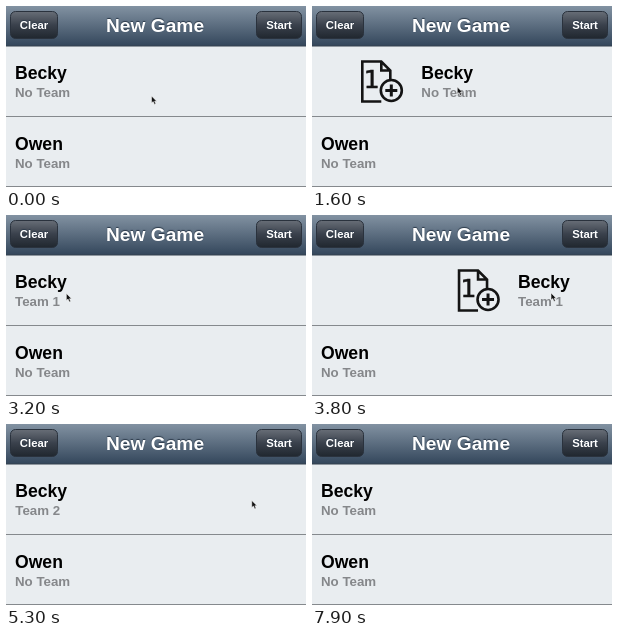
Animation of 300x181 px, one loop 8800 ms. Source, as an HTML page:

```html
<!DOCTYPE html>
<html lang="en">
<head>
<meta charset="utf-8">
<title>Swipe to pick a team</title>
<style>
  html, body { margin: 0; width: 100%; height: 100%; overflow: hidden; background: #e9edf0; }
  svg { display: block; width: 100%; height: 100%; }
  text { font: bold 17.6px "Liberation Sans", Arial, sans-serif; }
  .team { font-size: 13.3px; fill: #85878a; }
  .bar { fill: #fff; text-anchor: middle; text-shadow: 0 -1px 1px #2c3a4a; }
  .title { font-size: 19.2px; }
  .button { font-size: 11.3px; }
  #digit { font: 25px "DejaVu Sans", sans-serif; text-anchor: middle; }
</style>
</head>
<body>
<svg viewBox="0 0 300 181">
  <defs>
    <linearGradient id="header" x2="0" y2="1">
      <stop stop-color="#8292a2"/><stop offset="1" stop-color="#33465b"/>
    </linearGradient>
    <linearGradient id="button" x2="0" y2="1">
      <stop stop-color="#686e77"/><stop offset=".5" stop-color="#3a414c"/><stop offset="1" stop-color="#20272f"/>
    </linearGradient>
  </defs>
  <rect width="300" height="181" fill="#e9edf0"/>

  <g id="cell">
    <text x="9" y="73">Becky</text>
    <text class="team" id="team" x="9" y="91">No Team</text>
  </g>
  <text x="9" y="144">Owen</text>
  <text class="team" x="9" y="161.5">No Team</text>
  <path d="M0 110.5H300M0 180.5H300" stroke="#85898d"/>

  <g id="page" fill="none" stroke="#141414" stroke-width="2.6">
    <path d="M20 41H1V1H20L29 10V20M20 1V10H29"/>
    <text id="digit" x="10.5" y="27.5" fill="#141414" stroke-width=".5">1</text>
    <circle cx="30" cy="30" r="10.5" fill="#e9edf0"/>
    <path d="M24 30H36M30 24V36" stroke-width="3"/>
  </g>
  <path id="cross" d="M-7 -7L7 7M7 -7L-7 7" stroke="#0c0c0c" stroke-width="6"/>

  <rect width="300" height="40" fill="url(#header)"/>
  <path d="M0 40H300" stroke="#35414f"/>
  <g fill="url(#button)" stroke="#2a323d">
    <rect x="4.5" y="5.5" width="47" height="27" rx="5"/>
    <rect x="250.5" y="5.5" width="45" height="27" rx="5"/>
  </g>
  <text class="bar button" x="28" y="23">Clear</text>
  <text class="bar title" x="149" y="25.5">New Game</text>
  <text class="bar button" x="273" y="23">Start</text>

  <path id="cursor" d="M0 0V7L1.7 5.6L3 8.4L4.3 7.8L3.1 5.2H5.2Z" fill="#111" stroke="#fff" stroke-width=".5"/>
</svg>
<script>
const LOOP = 8800, STEP = 100;
const PAUSE = 400;    // the cursor rests and the label changes this long after a release
const SPRING = 120;   // decay time of the cell sliding back

const swipes = [
  { start: 1000, drag: 870, release: 1920, from: 45, to: 156, y: 81, team: 'Team 1' },
  { start: 3500, drag: 520, release: 4480, from: 42, to: 282, y: 78, team: 'Team 2' },
  { start: 5500, drag: 800, release: 6300, from: 234, to: 79, y: 76, team: 'No Team' }
];

const $ = id => document.getElementById(id);
const clamp = k => Math.max(0, Math.min(1, k));
const mix = (a, b, k) => a + (b - a) * k;
const smooth = k => k * k * (3 - 2 * k);
const easeOut = k => 1 - (1 - k) ** 2;
const progress = (t, from, to) => clamp((t - from) / (to - from));

function show(id, x, y, opacity = 1) {
  $(id).setAttribute('transform', `translate(${x} ${y})`);
  $(id).setAttribute('opacity', opacity);
}

function draw(t) {
  let x = 145.5, y = 90, cell = 0, held = false, team = 'No Team', free = 0;

  for (const s of swipes) {
    const approach = smooth(progress(t, free, s.start));
    const pulled = (s.to - s.from) * easeOut(progress(t, s.start, s.start + s.drag));
    x = mix(x, s.from, approach) + pulled;
    y = mix(y, s.y, approach);
    cell += pulled * Math.exp(-Math.max(0, t - s.release) / SPRING);
    held ||= t >= s.start && t <= s.release;
    free = s.release + PAUSE;
    if (t >= free) team = s.team;
  }
  const leave = smooth(progress(t, free, 7700));

  show('cell', cell, 0);
  $('team').textContent = team;
  $('digit').textContent = cell > 200 ? 2 : 1;
  show('page', held ? Math.max(9, cell - 51) : cell - 48, 54.5, clamp(cell / 60));
  show('cross', Math.min(291, 330 + cell), 76, held ? clamp(-cell / 75) : 0);
  show('cursor', mix(x, 240, leave), mix(y, 15, leave), leave < 1 ? 1 : 0);
}

const start = performance.now();
function tick() {
  const t = (performance.now() - start) % LOOP;
  draw(Math.floor(t / STEP) * STEP);
  requestAnimationFrame(tick);
}
tick();
</script>
</body>
</html>
```
